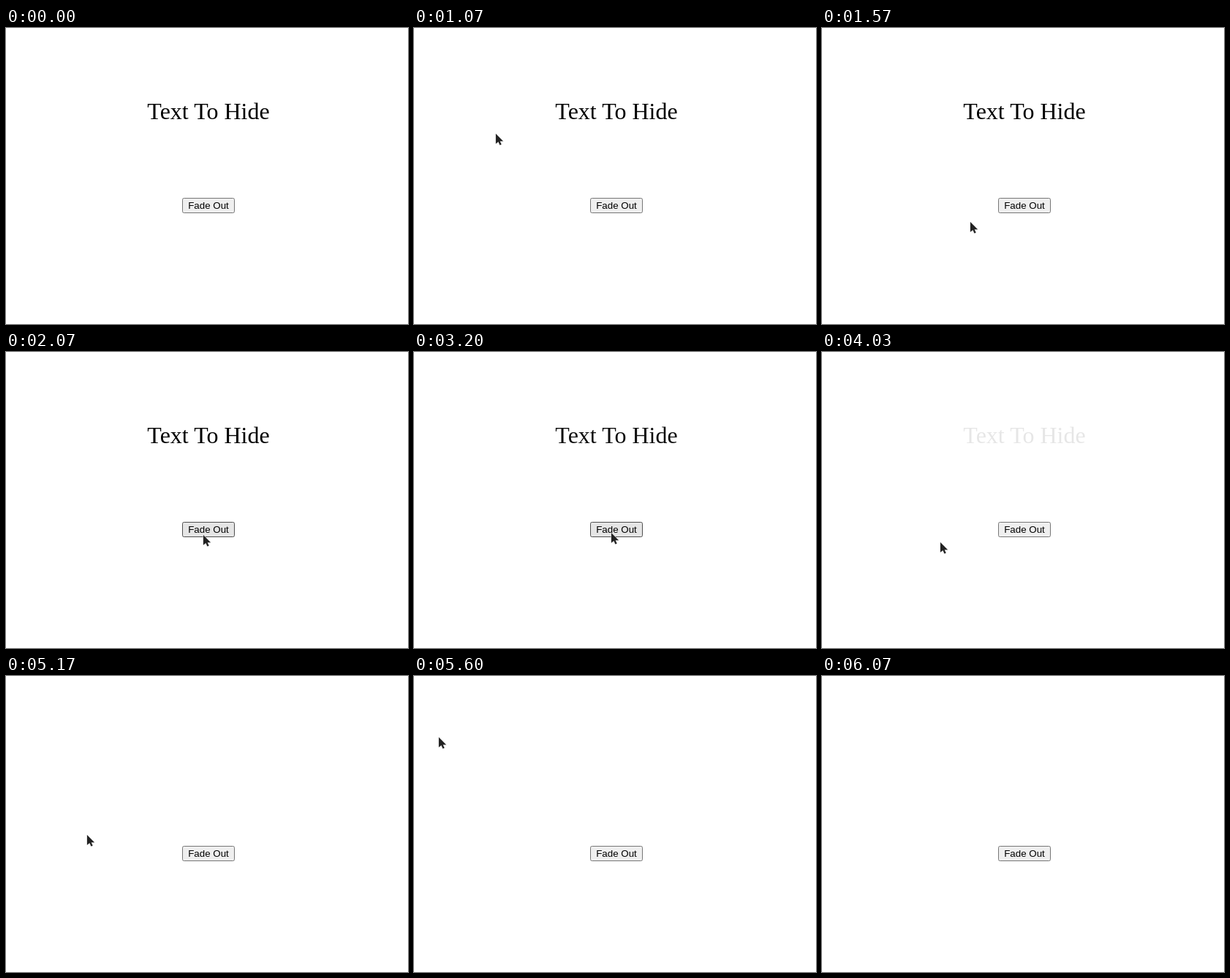
These frames come from a looping animation (550x406 px, 7.63 s). An HTML page:

```html
<!DOCTYPE html>
<html lang="en">
<head>
<meta charset="utf-8">
<title>Fade Out</title>
<style>
  :root {
    --loop: 7630ms infinite;
    --speed-up: cubic-bezier(.333, 0, .667, .333);
    --slow-down: cubic-bezier(.333, .667, .667, 1);
    --settle: cubic-bezier(.333, .28, .667, 1);
  }
  html, body { margin: 0; width: 100%; height: 100%; overflow: hidden; background: #fff; }
  .stage { position: relative; width: 550px; height: 406px; overflow: hidden; cursor: default; }
  .text {
    position: absolute; left: 0; top: 96px; width: 554px;
    font: 32px/36px "Liberation Serif", "Times New Roman", serif;
    text-align: center; color: #000;
    animation: fade var(--loop);
  }
  .button {
    position: absolute; left: 241px; top: 233px; width: 72px; height: 21px;
    box-sizing: border-box; padding-top: 2px;
    border: 1px solid #767676; border-radius: 2.5px; background: #efefef;
    font: 13.3333px/15px "Liberation Sans", Arial, sans-serif;
    text-align: center; white-space: nowrap; color: #000;
    animation: hover var(--loop) step-end;
  }
  .pointer {
    position: absolute; overflow: visible;
    filter: drop-shadow(.4px .7px .6px rgba(0, 0, 0, .45));
    animation: across var(--loop), down var(--loop);
  }

  @keyframes fade {
    0% { opacity: 1; }
    40.5% { opacity: 1; animation-timing-function: ease; }
    60.16%, 100% { opacity: 0; }
  }
  @keyframes hover {
    26.9% { background: #e5e5e5; border-color: #4f4f4f; }
    44.4% { background: #efefef; border-color: #767676; }
  }

  /* Horizontal and vertical parts of the pointer's path */
  @keyframes across {
    0%, 9.17% { left: 104px; animation-timing-function: var(--slow-down); }
    13.11% { left: 97px; animation-timing-function: var(--speed-up); }
    20.58% { left: 202px; animation-timing-function: var(--slow-down); }
    27.13%, 42.46% { left: 269px; animation-timing-function: ease; }
    58.98%, 64.22% { left: 149px; animation-timing-function: cubic-bezier(.333, .11, .667, 1); }
    74.31% { left: 31px; animation-timing-function: var(--speed-up); }
    79.55%, 100% { left: 37px; }
  }
  @keyframes down {
    0%, 9.17% { top: -23px; animation-timing-function: var(--settle); }
    24.25% { top: 275px; animation-timing-function: ease-in-out; }
    27.13% { top: 249px; animation-timing-function: step-end; }
    37.09%, 42.46% { top: 246px; animation-timing-function: ease-in-out; }
    50.2% { top: 265px; animation-timing-function: var(--settle); }
    58.98%, 64.22% { top: 253px; animation-timing-function: cubic-bezier(.333, .02, .667, .92); }
    79.55%, 100% { top: -23px; }
  }
</style>
</head>
<body>
<div class="stage">
  <div class="text">Text To Hide</div>
  <div class="button">Fade Out</div>
  <svg class="pointer" width="13" height="20">
    <path fill="#222" stroke="#fff" stroke-linejoin="round" paint-order="stroke"
      d="M1 2V15.8L4.4 12.9L6.4 17.6L8.6 16.7L6.6 12.2H11Z"/>
  </svg>
</div>
</body>
</html>
```
